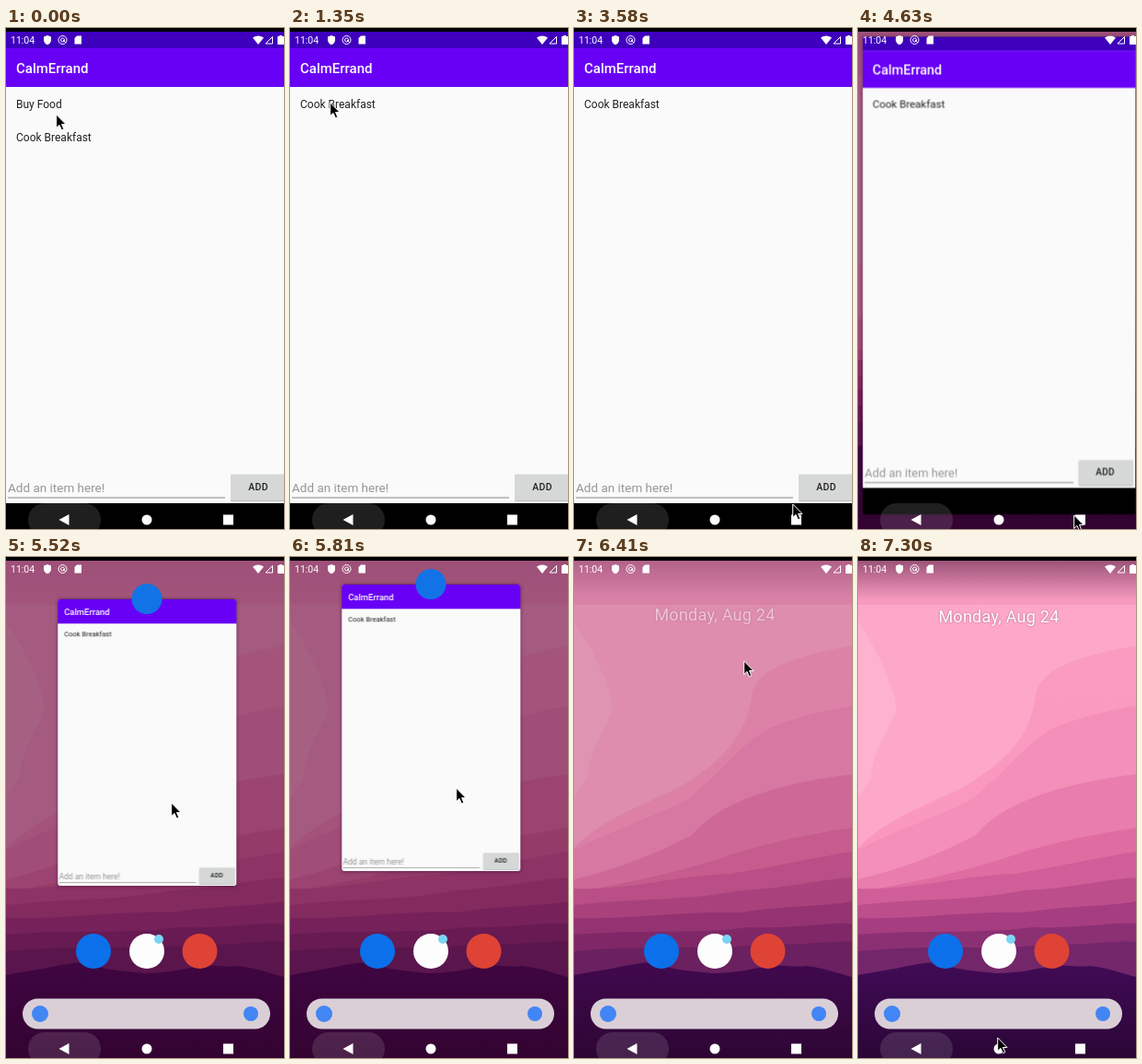
These frames come from a looping animation (302 by 544 pixels, 8000 ms). An HTML page:

```html
<!DOCTYPE html>
<html lang="en">
<head>
<meta charset="utf-8">
<title>To-do list demo</title>
<style>
html, body { margin: 0; width: 100%; height: 100%; overflow: hidden; background: #000; }
#stage { position: relative; width: 302px; height: 544px; overflow: hidden; font-family: Roboto, sans-serif; }
svg { position: absolute; left: 0; top: 0; display: block; }
text { white-space: pre; }
.medium { font-weight: 500; }

/* Every change is a hard cut held until the next one */
.anim { animation: 8s step-end infinite; }
#cursor { animation-name: cursor; }
#window { position: absolute; left: 0; top: 0; width: 308px; height: 546px; transform-origin: 0 0;
  filter: drop-shadow(0 1px 3px rgba(30,0,30,.45)); animation-name: window; }
#app { width: 308px; height: 546px; animation-name: crop; }
#first { animation-name: first; }
#second { animation-name: second; }
#toast { animation-name: toast; }
#badge { animation-name: badge; }
#scrim { animation-name: scrim; }
#date { animation-name: date; }

@keyframes cursor {
  0% { transform: translate(54px, 93px); }
  1.875% { transform: translate(47px, 85px); }
  3.75% { transform: translate(43px, 80px); }
  28.125% { transform: translate(56px, 101px); }
  30% { transform: translate(92px, 180px); }
  31.875% { transform: translate(138px, 275px); }
  33.625% { transform: translate(160px, 321px); }
  37.375% { transform: translate(170px, 365px); }
  39.25% { transform: translate(195px, 430px); }
  41.125% { transform: translate(220px, 485px); }
  43% { transform: translate(237px, 516px); }
  44.875% { transform: translate(238px, 526px); }
  46.625% { transform: translate(232px, 528px); }
  50.375% { transform: translate(233px, 529px); }
  52.25% { transform: translate(234px, 528px); }
  61.625% { transform: translate(226px, 480px); }
  63.5% { transform: translate(205px, 380px); }
  65.25% { transform: translate(182px, 290px); }
  69% { transform: translate(179px, 266px); }
  70.875% { transform: translate(180px, 250px); }
  72.75% { transform: translate(183px, 190px); }
  74.625% { transform: translate(187px, 110px); }
  76.5% { transform: translate(189px, 65px); }
  78.25% { transform: translate(189px, 57px); }
  80.125% { transform: translate(184px, 112px); }
  82% { transform: translate(177px, 297px); }
  83.875% { transform: translate(175px, 345px); }
  85.75% { transform: translate(168px, 420px); }
  87.625% { transform: translate(156px, 490px); }
  89.5% { transform: translate(150px, 519px); }
  91.25% { transform: translate(151px, 521px); }
}
@keyframes window {
  0% { transform: none; }
  57.875% { transform: translate(5.2px, 3.5px) scale(.961); }
  59.75% { transform: translate(22px, 13px) scale(.852); }
  61.625% { transform: translate(42px, 24px) scale(.723); }
  63.5% { transform: translate(53.5px, 30.5px) scale(.649); }
  65.25% { transform: translate(56.3px, 32px) scale(.63); }
  70.875% { transform: translate(56.3px, 16px) scale(.63); }
  72.75% { transform: translate(56.3px, -44px) scale(.63); }
  74.625% { transform: translate(56.3px, -128px) scale(.63); }
  76.5% { transform: translate(56.3px, -298px) scale(.63); }
  78.25% { transform: translate(56.3px, -500px) scale(.63); }
}
@keyframes crop {
  0% { clip-path: inset(0); }
  57.875% { clip-path: inset(6.5px 0 0 round 1px); }
  59.75% { clip-path: inset(12px 0 14px round 2px); }
  61.625% { clip-path: inset(18px 0 24px round 3px); }
  63.5% { clip-path: inset(22px 0 30px round 5px); }
}
@keyframes first { 0% { opacity: 1; } 16.875% { opacity: 0; } }
@keyframes second { 0% { transform: none; } 16.875% { transform: translateY(-36px); } }
@keyframes toast {
  0%, 16.875% { opacity: 0; }
  18.75% { opacity: .6; }
  20.625% { opacity: 1; }
  41.125% { opacity: .5; }
  43% { opacity: 0; }
}
@keyframes badge {
  0% { opacity: 0; }
  61.625% { opacity: .5; transform: translateY(-6px); }
  63.5% { opacity: 1; transform: none; }
  70.875% { opacity: 1; transform: translateY(-16px); }
  72.75% { opacity: 1; transform: translateY(-76px); }
  74.625% { opacity: 0; }
}
@keyframes scrim { 0% { opacity: .46; } 80.125% { opacity: .16; } 82% { opacity: 0; } }
@keyframes date {
  0% { opacity: 0; transform: translateY(-2px); }
  80.125% { opacity: .5; transform: translateY(-2px); }
  82% { opacity: 1; transform: none; }
}
</style>
</head>
<body>
<div id="stage">

  <!-- Home screen -->
  <svg width="302" height="544">
    <defs>
      <linearGradient id="sky" x2="0" y2="1">
        <stop offset="0" stop-color="#ee93bb"/><stop offset=".12" stop-color="#fb9cc1"/><stop offset="1" stop-color="#f893bb"/>
      </linearGradient>
      <linearGradient id="shade" x2="0" y2="1">
        <stop offset="0" stop-color="#4a1434" stop-opacity=".5"/><stop offset="1" stop-color="#4a1434" stop-opacity="0"/>
      </linearGradient>
      <linearGradient id="hills" x2="0" y2="1">
        <stop offset="0" stop-color="#410b56"/><stop offset="1" stop-color="#2a0636"/>
      </linearGradient>
    </defs>
    <rect width="302" height="544" fill="url(#sky)"/>
    <path fill="#fda8c8" d="M0 52H302V96C250 106 202 118 194 146C188 188 172 214 118 248C70 272 30 285 0 316Z"/>
    <path fill="#feb2cd" d="M0 70C20 100 36 130 42 164C34 190 16 210 14 240L0 262Z"/>
    <path fill="#f38fb9" d="M0 318C38 298 80 285 122 264C156 238 180 204 212 186C240 174 274 166 302 162V380H0Z"/>
    <path fill="#e97dad" d="M0 350C50 338 90 322 128 302C158 266 220 246 302 236V390H0Z"/>
    <path fill="#df6da1" d="M0 364C70 352 130 338 180 320C220 308 262 300 302 294V400H0Z"/>
    <path fill="#d05e98" d="M0 360C60 362 110 346 170 344C220 336 262 326 302 320V410H0Z"/>
    <path fill="#bd4e8c" d="M0 378C70 370 120 374 180 362C230 360 270 350 302 348V420H0Z"/>
    <path fill="#a63d80" d="M0 392C60 394 120 384 180 386C230 378 270 380 302 374V440H0Z"/>
    <path fill="#8c3074" d="M0 410C70 404 130 410 190 402C240 404 270 396 302 398V450H0Z"/>
    <path fill="#73266a" d="M0 428C80 420 150 428 210 420C250 422 280 416 302 418V470H0Z"/>
    <path fill="url(#hills)" d="M0 454C20 450 38 448 54 444C70 442 80 438 94 443C112 449 132 450 150 452C174 452 190 448 206 445C222 441 236 446 252 444C272 446 286 452 302 456V544H0Z"/>
    <rect id="scrim" class="anim" width="302" height="544" fill="#3d002a"/>
    <g id="date" class="anim">
      <rect y="4" width="302" height="42" fill="url(#shade)"/>
      <text x="153" y="71" font-size="18" letter-spacing=".25" text-anchor="middle" fill="#fff" style="text-shadow:0 0 2px rgba(90,20,60,.55)">Monday, Aug 24</text>
    </g>
    <circle cx="95" cy="428" r="19" fill="#0b70ea"/>
    <circle cx="153" cy="428" r="19" fill="#fdfdfd"/>
    <circle cx="166" cy="415" r="5" fill="#7bd5f5"/>
    <circle cx="210.500" cy="428" r="19" fill="#df4335"/>
    <rect x="18" y="479.500" width="269" height="33" rx="16.500" fill="#dacfd7"/>
    <circle cx="37" cy="496" r="9" fill="#4285f4"/>
    <circle cx="266" cy="496" r="8" fill="#4285f4"/>
  </svg>

  <!-- To-do app -->
  <div id="window" class="anim">
    <div id="app" class="anim">
      <svg width="308" height="546">
        <rect width="308" height="546"/>
        <rect y="4" width="308" height="18" fill="#3f00be"/>
        <rect y="22" width="308" height="494" fill="#fafafa"/>
        <rect y="22" width="308" height="42" fill="#6800f6"/>
        <text class="medium" x="11" y="49" font-size="15" fill="#fff">CalmErrand</text>
        <g font-size="12" fill="#212121">
          <text id="first" class="anim" x="11" y="86.500">Buy Food</text>
          <text id="second" class="anim" x="11" y="122.500">Cook Breakfast</text>
        </g>
        <text x="2" y="504" font-size="13.500" fill="#979797">Add an item here!</text>
        <rect x="2" y="509.500" width="236" height="1" fill="#858585"/>
        <rect x="244" y="485.500" width="61.500" height="28.500" rx="1.500" fill="#bdbdbd"/>
        <rect x="244" y="484.500" width="61.500" height="28.500" rx="1.500" fill="#d6d7d7"/>
        <text class="medium" x="274" y="502" font-size="10.500" letter-spacing=".3" text-anchor="middle" fill="#212121">ADD</text>
      </svg>
    </div>
  </div>

  <!-- System bars, toast and pointer -->
  <svg width="302" height="544">
    <circle id="badge" class="anim" cx="153" cy="45.500" r="16.500" fill="#1273e6"/>
    <g id="toast" class="anim">
      <rect x="91" y="461" width="124" height="37" rx="18.500" fill="#eee"/>
      <text x="153" y="484" font-size="10.500" letter-spacing=".1" text-anchor="middle" fill="#2b2b2b">Item was removed</text>
    </g>
    <rect width="302" height="4"/>
    <g fill="#fff">
      <text x="5" y="17" font-size="10.500">11:04</text>
      <path d="M45 8L49 9.500V13C49 15.500 47.300 17.500 45 18.300C42.700 17.500 41 15.500 41 13V9.500Z"/>
      <circle cx="61.500" cy="13" r="4.500" fill="none" stroke="#fff"/>
      <circle cx="61.500" cy="13" r="2" fill="none" stroke="#fff"/>
      <path d="M62 13L65 16" stroke="#fff"/>
      <path d="M77 8.500H82V17.500H74.500V11Z"/>
      <path d="M268 10.500Q274 6.500 280 10.500L274 18Z"/>
      <path d="M289.500 9.500V17H282Z" fill="none" stroke="#fff"/>
      <path d="M295 9H297V8H300V9H302V18H295Z"/>
      <rect x="24" y="516" width="79" height="36" rx="18" fill-opacity=".12"/>
      <path d="M57.500 534L68.500 528V540Z"/>
      <circle cx="153" cy="534" r="5.500"/>
      <rect x="236" y="528.500" width="11" height="11"/>
    </g>
    <g id="cursor" class="anim">
      <path d="M.7 1V15.500L4 12.400L6.400 17.800L8.800 16.700L6.500 11.500H11Z" stroke="#fff"/>
    </g>
  </svg>
</div>
</body>
</html>
```
